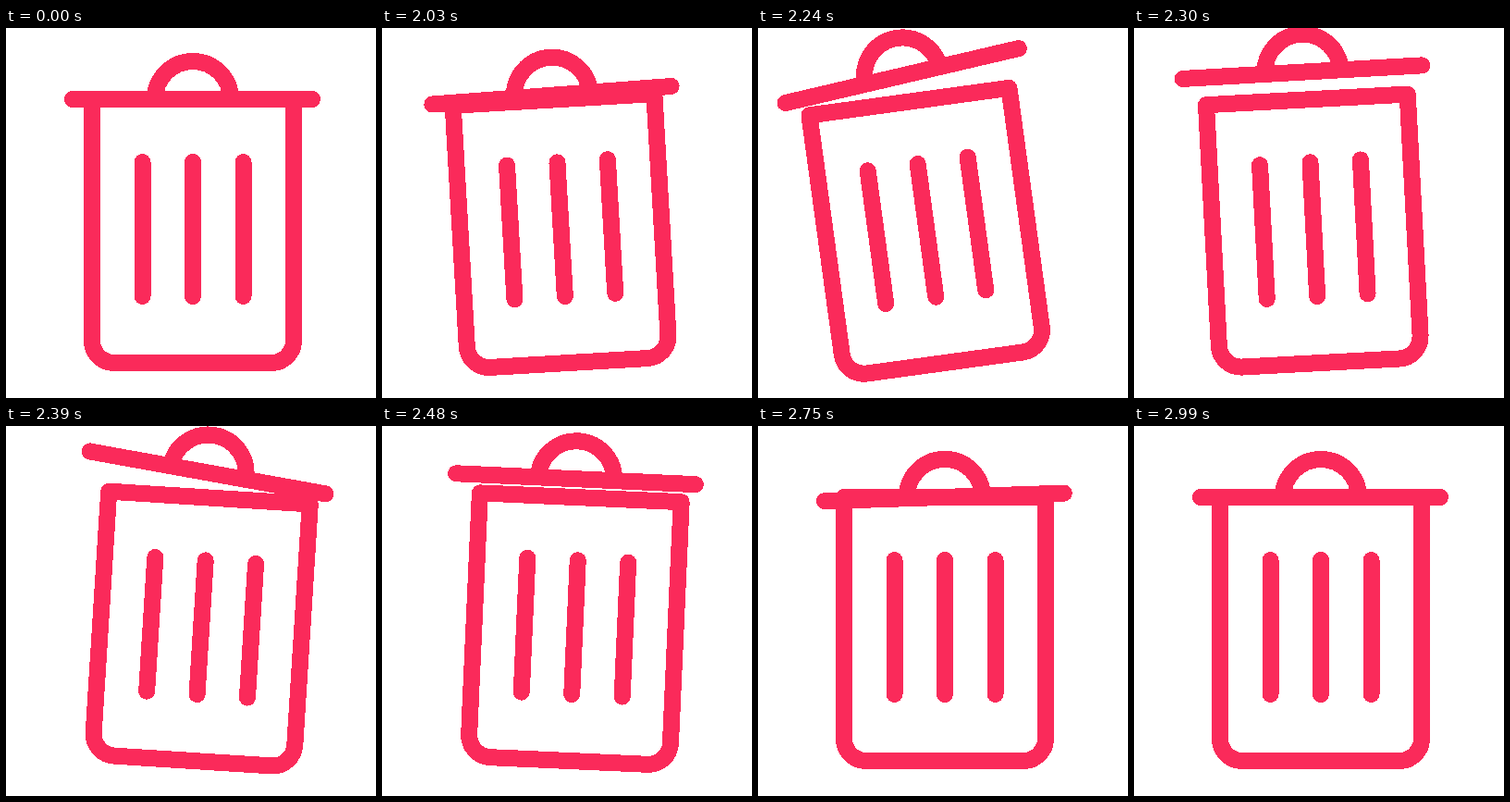
Recreate the animation shown at these times as an HTML page. Size 400 by 400 pixels, loop 3.02 s.

```html
<!DOCTYPE html>
<html lang="en">
<head>
<meta charset="utf-8">
<title>Trash can</title>
<style>
  html, body { margin: 0; width: 100%; height: 100%; overflow: hidden; background: #fff; }
  svg { display: block; width: 100%; height: 100%; }
</style>
</head>
<body>
<svg viewBox="0 0 400 400" fill="none" stroke="#fa2a5a" stroke-width="18"
     stroke-linecap="round" stroke-linejoin="round" shape-rendering="crispEdges">
  <g id="can">
    <path d="M93 77H311V338a24 24 0 0 1-24 24H117a24 24 0 0 1-24-24Z"/>
    <path d="M147.5 145V290M202 145V290M256.5 145V290"/>
    <path id="lid" d="M72 77H331M161 77a41 41 0 0 1 82 0"/>
  </g>
</svg>
<script>
const LOOP = 3020, START = 2000, STEP = 30;
const can = document.getElementById('can');
const lid = document.getElementById('lid');

const swing = u => (1 - Math.cos(Math.PI * u)) / 2;
const rush = u => Math.sin(Math.PI * u / 2);

// Eases from 0 at time 0 through poses of [time, value, ease].
function pose(t, ...poses) {
  let from = 0, start = 0;
  for (const [end, to, ease = swing] of poses) {
    if (t < end) return from + (to - from) * ease((t - start) / (end - start));
    [from, start] = [to, end];
  }
  return from;
}

function draw(now) {
  // The shake advances in fixed steps after the long rest.
  const t = Math.max(0, Math.floor((now % LOOP - START) / STEP) * STEP);
  const tilt = pose(t, [135, -9.7, rush], [180, -9.7], [430, 4.5], [540, 0]);

  // The lid moves relative to the can.
  const lidTilt = pose(t, [110, -5.8], [220, -5.8], [390, 6.6], [540, -3.4], [990, 0]);
  const lift = pose(t, [290, 30, rush], [770, 0]);
  const shift = pose(t, [90, -5], [340, -2.6], [540, -6.5], [770, 0]);

  can.setAttribute('transform', `rotate(${tilt} 202 362)`);
  lid.setAttribute('transform', `translate(${shift} ${-lift}) rotate(${lidTilt} 202 77)`);
  requestAnimationFrame(draw);
}
draw(0);
</script>
</body>
</html>
```
